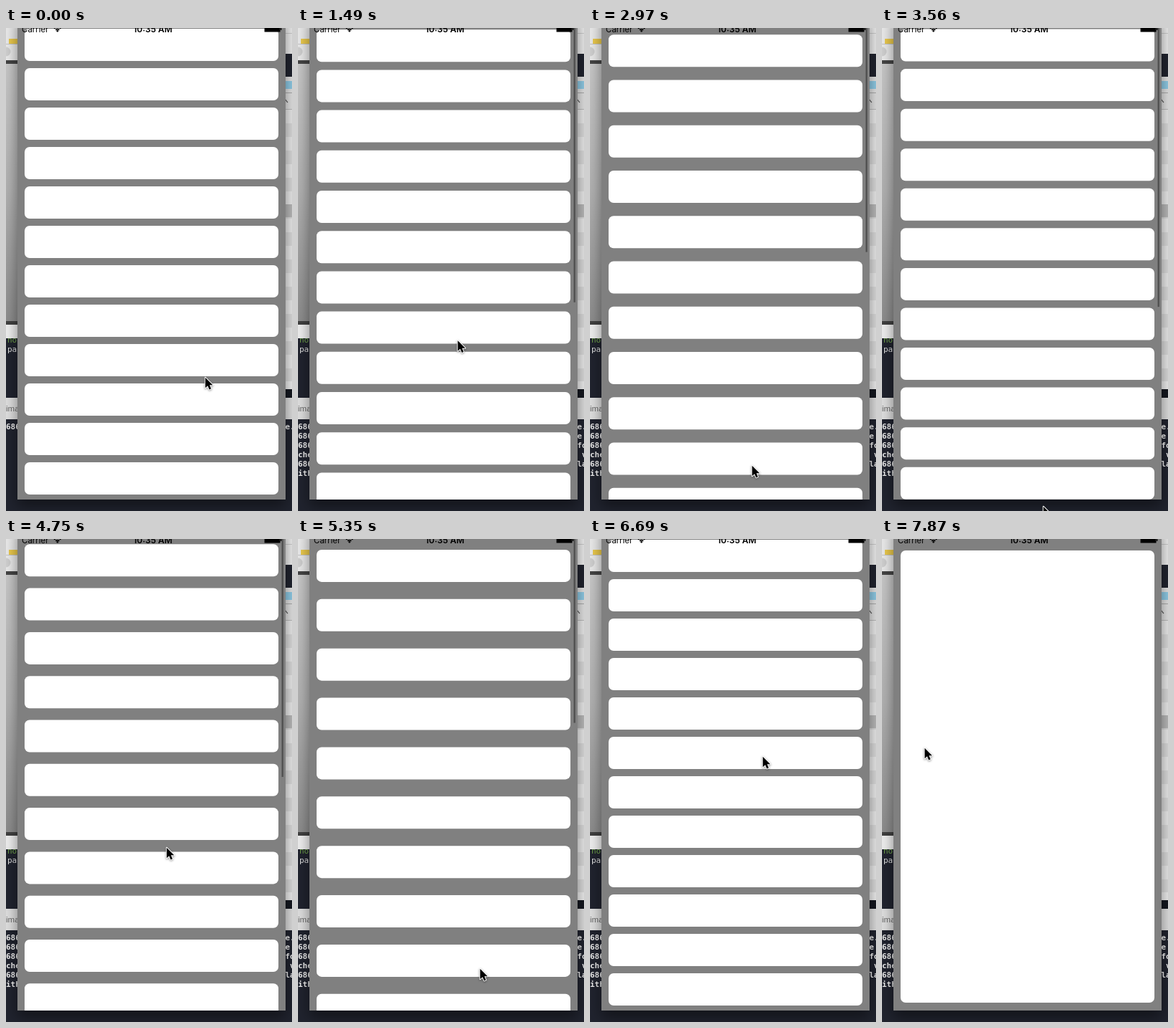
Write an HTML page with a canvas that moves like this. It is 400 by 674 pixels and loops after 8 s.

```html
<!DOCTYPE html>
<html lang="en">
<head>
<meta charset="utf-8">
<title>Springy list</title>
<style>
  html, body { margin: 0; width: 100%; height: 100%; overflow: hidden; background: #20232e; }
  canvas { display: block; }
</style>
</head>
<body>
<canvas id="stage" width="400" height="674"></canvas>
<script>
const ctx = document.getElementById('stage').getContext('2d');
const LOOP = 8000, TICK = 148.6;
const MONO = '"DejaVu Sans Mono", monospace';
const SANS = 'Inter, "Liberation Sans", sans-serif';

// tick, cursor x, cursor y, extra gap between cards
const KEYS = [
  [1, 278, 487, 0], [2, 254, 449, 0], [3, 222, 399, 0], [8, 222, 399, 0],
  [9, 222, 412, .5], [13, 225, 506, 3.3], [14, 225, 506, 3.3],
  [15, 227, 527, 4.7], [16, 227, 540, 5.4], [17, 227, 540, 5.4],
  [18, 227, 553, 6], [22, 225, 667, 10.5], [23, 225, 667, 2.6],
  [24, 225, 667, .56], [25, 224, 600, .08], [28, 222, 300, 0], [29, 222, 300, 0],
  [30, 222, 345, 2.2], [32, 224, 430, 6.3], [36, 254, 599, 13.88],
  [37, 254, 599, 13.88], [38, 254, 585, 11], [39, 252, 530, 4.5],
  [40, 249, 460, 1.3], [41, 246, 395, .35], [43, 241, 312, .02],
  [44, 241, 305, 0], [45, 241, 303, 0], [51, 241, 303, 0], [53, 59, 291, 0]
];

function pose(tick) {
  const i = KEYS.findIndex(k => k[0] >= tick);
  if (i <= 0) return KEYS[0].slice(1);
  const a = KEYS[i - 1], b = KEYS[i];
  const u = (tick - a[0]) / (b[0] - a[0]);
  return a.slice(1).map((v, j) => v + (b[j + 1] - v) * u);
}

function rect(color, x, y, w, h) {
  ctx.fillStyle = color;
  ctx.fillRect(x, y, w, h);
}

function text(str, x, y, font, color) {
  ctx.font = font;
  ctx.fillStyle = color;
  ctx.fillText(str, x, y);
}

function card(y, h) {
  ctx.beginPath();
  ctx.roundRect(26, y, 355, h, 7);
  ctx.fill();
}

function desktop(tick) {
  rect('#20232e', 0, 0, 400, 674);

  // left edge
  rect('#e9e9e9', 0, 0, 16, 45);
  rect('#e9c84c', 4, 15, 12, 7);
  rect('#c4c4c4', 0, 22, 16, 1);
  ctx.fillStyle = '#cfcfcf';
  ctx.beginPath();
  ctx.arc(0, 33, 6.5, 0, 7);
  ctx.fill();
  rect('#444', 0, 45, 16, 5);
  const photo = ctx.createLinearGradient(0, 50, 0, 409);
  photo.addColorStop(0, '#c6c6c6');
  photo.addColorStop(.5, '#b0b0b0');
  photo.addColorStop(1, '#8c8c8c');
  rect(photo, 0, 50, 16, 359);
  rect('#404040', 0, 409, 16, 5);
  rect('#eee', 0, 414, 16, 19);
  ctx.save();
  ctx.beginPath();
  ctx.rect(0, 433, 16, 83);
  ctx.clip();
  text('no', 2, 439, '11px ' + MONO, '#6fa34a');
  text('pa', 2, 452, '11px ' + MONO, '#e4e4e4');
  ctx.restore();

  // right edge
  rect('#eee', 391, 0, 9, 36);
  rect('#ccc', 391, 7, 9, 1);
  rect('#e2e2e2', 391, 68, 9, 45);
  rect('#8fcbe6', 391, 74, 9, 11);
  rect('#aaa', 391, 90, 9, 1);
  ctx.strokeStyle = '#444';
  ctx.lineWidth = 1.2;
  ctx.beginPath();
  ctx.moveTo(390, 99);
  ctx.lineTo(394, 104);
  ctx.stroke();
  rect('#bbb', 391, 113, 9, 1);
  for (let i = 0; i < 21; i++) rect(i % 2 ? '#dcdcdc' : '#ebebeb', 391, 114 + i * 19, 9, 19);
  rect('#b9b9b9', 391, 246, 9, 18);
  rect('#eee', 391, 493, 9, 11);
  rect('#14171f', 391, 504, 9, 13);

  // terminal
  rect('#dedede', 0, 516, 400, 30);
  text('ima', 0, 535, '11.5px "Liberation Sans", sans-serif', '#666');
  const left = ['686', '686', '686', 'che', '686', 'ith'];
  const right = ['e.', 'e', 'fo', ' v', 'la', ''];
  for (let i = 0; i < (tick < 9 ? 1 : 6); i++) {
    const y = 560 + i * 13;
    text(left[i], 0, y, 'bold 11px ' + MONO, '#f2f2f2');
    text(right[i], 390.5, y, 'bold 11px ' + MONO, '#f2f2f2');
  }
}

function phone(tick, gap) {
  ctx.save();
  ctx.shadowColor = 'rgba(0,0,0,.45)';
  ctx.shadowBlur = 18;
  ctx.shadowOffsetY = 9;
  rect('#808080', 16, -20, 375, 678);
  ctx.restore();

  ctx.save();
  ctx.beginPath();
  ctx.rect(16, 0, 375, 658);
  ctx.clip();

  // the tapped card grows and pushes the others away
  const u = Math.min(1, Math.max(0, (tick - 46) / 4));
  const grow = u * u * (3 - 2 * u);
  ctx.fillStyle = '#fff';
  for (let i = 0; i < 13; i++) {
    const y = 1 + 55 * i + gap * (i + 1);
    if (i === 5) card(y - 260 * grow, 45 + 586 * grow);
    else card(y + (i < 5 ? -272 : 340) * grow, 45);
  }

  rect(`rgba(0,0,0,${.36 * Math.min(1, gap * 10)})`, 385.5, 0, 2.5, 394.7 - 9.95 * gap);
  statusBar();
  ctx.restore();
}

function statusBar() {
  text('Carrier', 22, 5.5, '11.5px ' + SANS, '#000');
  text('10:35 AM', 178, 5.5, '600 12px ' + SANS, '#000');
  ctx.strokeStyle = '#000';
  ctx.lineWidth = 1.7;
  for (const r of [3.6, 6.6]) {
    ctx.beginPath();
    ctx.arc(72, 5.5, r, -2.35, -.8);
    ctx.stroke();
  }
  ctx.fillStyle = '#000';
  ctx.beginPath();
  ctx.arc(72, 4.3, 1.3, 0, 7);
  ctx.fill();
  rect('#000', 361.5, -3, 22, 8.5);
  rect('#000', 384, 0, 1.3, 3);
}

function cursor(x, y) {
  const arrow = new Path2D('M0 0V14.5L3.4 11.4L5.7 16.6L8.2 15.5L6 10.4H10.5Z');
  ctx.save();
  ctx.translate(x + .7, y + .8);
  ctx.lineJoin = 'round';
  ctx.lineWidth = 2;
  ctx.strokeStyle = '#fff';
  ctx.shadowColor = 'rgba(0,0,0,.45)';
  ctx.shadowBlur = 3;
  ctx.shadowOffsetY = 1;
  ctx.stroke(arrow);
  ctx.shadowColor = 'transparent';
  ctx.fillStyle = '#000';
  ctx.fill(arrow);
  ctx.restore();
}

function draw(now) {
  const tick = Math.floor((now % LOOP + 6) / TICK);
  const [x, y, gap] = pose(tick);
  desktop(tick);
  phone(tick, gap);
  cursor(x, y);
  requestAnimationFrame(draw);
}
draw(0);
</script>
</body>
</html>
```
